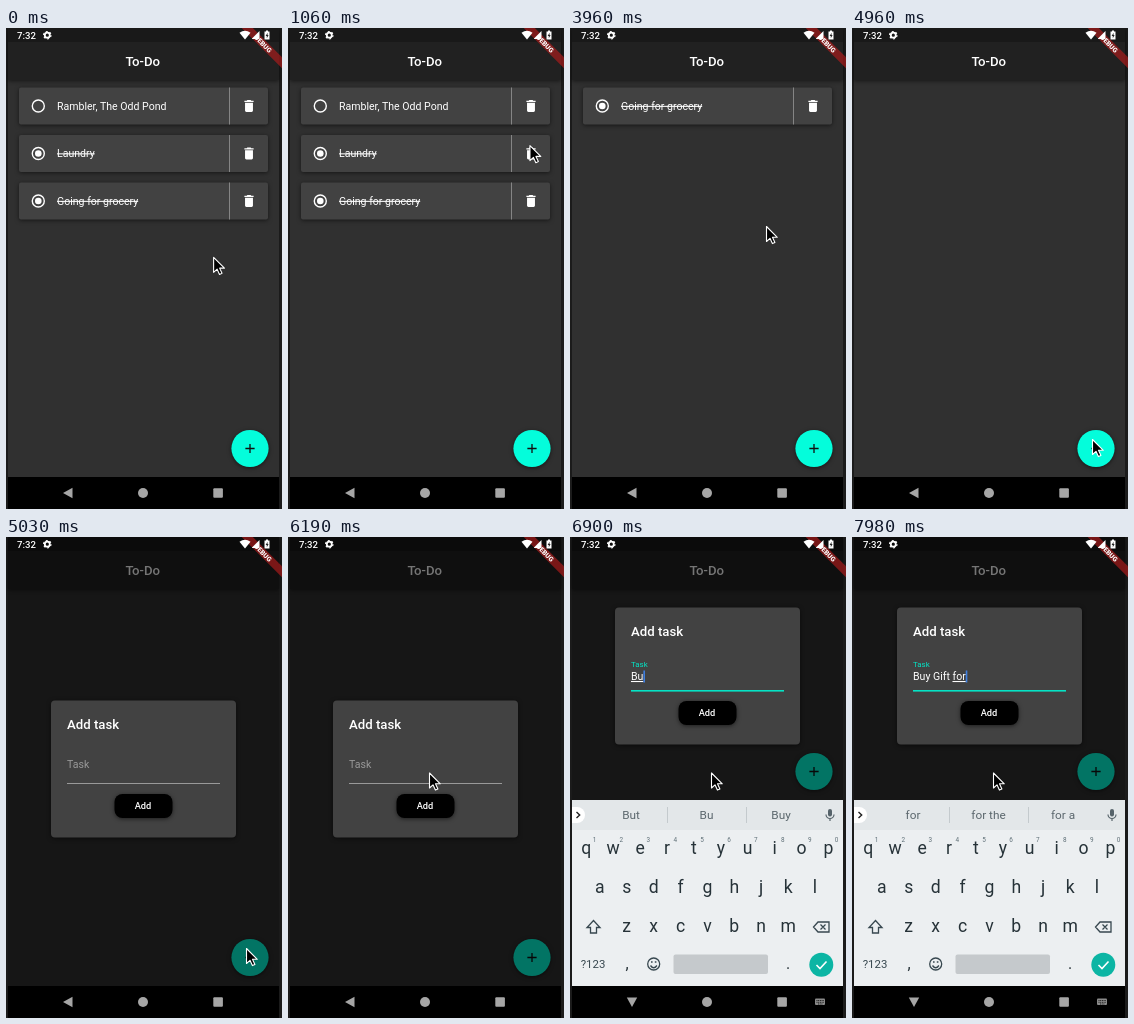
Recreate the animation shown at these times as an HTML page. Size 276 by 481 pixels, loop 8 s.

```html
<!DOCTYPE html>
<html lang="en">
<head>
<meta charset="utf-8">
<title>To-Do</title>
<style>
html, body { margin: 0; height: 100%; overflow: hidden; background: #1b1b1b; }
svg { display: block; width: 100vw; height: 100vh; font-family: Roboto, sans-serif; }
.mid { text-anchor: middle; }
.bold { font-weight: 500; }
.struck { text-decoration: line-through; }
.lift { filter: drop-shadow(0 1px 2px rgba(0,0,0,.55)); }
.line { fill: none; stroke: #37474f; stroke-width: 1.3; }
</style>
</head>
<body>
<svg id="stage" viewBox="0 0 276 481"></svg>
<script>
const LOOP = 8000;
const ACCENT = '#04fddb';
const TRASH = 'M6 19c0 1.1.9 2 2 2h8c1.1 0 2-.9 2-2V7H6v12zM19 4h-3.5l-1-1h-5l-1 1H5v2h14V4z';
const PLUS = 'M19 13h-6v6h-2v-6H5v-2h6V5h2v6h6v2z';

// Markup helpers
const text = (x, y, s, size, fill = '#fff', cls = '', extra = '') =>
  `<text x="${x}" y="${y}" font-size="${size}" fill="${fill}" class="${cls}" ${extra}>${s}</text>`;
const rect = (x, y, w, h, fill, extra = '') =>
  `<rect x="${x}" y="${y}" width="${w}" height="${h}" fill="${fill}" ${extra}/>`;
const circle = (x, y, r, fill, extra = '') =>
  `<circle cx="${x}" cy="${y}" r="${r}" fill="${fill}" ${extra}/>`;
const path = (d, fill, extra = '') => `<path d="${d}" fill="${fill}" ${extra}/>`;
const icon = (x, y, d, fill) =>
  path(d, fill, `transform="translate(${x} ${y}) scale(.66) translate(-12 -12)"`);

const tile = (id, label, done) => `<g id="${id}">
  ${rect(13, 59.5, 249, 37, '#424242', 'rx="2" class="lift"')}
  ${circle(32.3, 78, 6, 'none', 'stroke="#fff" stroke-width="1.4"')}
  ${done ? circle(32.3, 78, 3.3, '#fff') : ''}
  ${text(51, 81.7, label, 10.56, '#fff', done ? 'struck' : '')}
  ${rect(223, 59.5, 1, 37, '#858585')}
  ${icon(243, 78, TRASH, '#fff')}</g>`;

const statusBar = `
  ${text(11, 10.6, '7:32', 9.6, '#fff', 'bold')}
  ${circle(41.3, 7.2, 2.5, 'none', 'stroke="#fff" stroke-width="1.8"')}
  ${circle(41.3, 7.2, 3.7, 'none', 'stroke="#fff" stroke-width="1.2" stroke-dasharray="1.9 1.97"')}
  ${path('M239 11.5L233.5 4.8Q239 .8 244.5 4.8Z', '#fff')}
  ${path('M246 11V10.5L253.5 3V11Z', '#fff')}
  ${path('M258.5 3.5H260V2.5H262V3.5H263.5V11.5H258.5Z', '#fff')}
  ${path('M261.6 4.8L259.6 8H260.8V10.3L262.6 7H261.5Z', '#222')}`;

const banner = `<g transform="translate(273 0) rotate(45)">
  ${rect(-40, 18.5, 80, 7.9, 'rgba(183,28,28,.63)')}
  ${text(0, 24.9, 'DEBUG', 6.7, '#fff', 'mid', 'font-weight="900"')}</g>`;

const dialog = `<g id="dialog">
  ${rect(45, 163.5, 185, 137, '#424242', 'rx="4" class="lift"')}
  ${text(61, 192, 'Add task', 13.2, '#fff', 'bold')}
  ${text(61, 0, 'Task', 10.56, '#999', '', 'id="label"')}
  <text id="typed" x="61" y="236" font-size="10.56" fill="#fff"><tspan></tspan><tspan text-decoration="underline"></tspan></text>
  ${rect(0, 226.5, 1.6, 12, '#3f7fe0', 'id="caret"')}
  ${rect(61, 246, 153, 1, '#999', 'id="rule"')}
  ${rect(108.5, 257, 58, 24, '#000', 'rx="8" class="lift"')}
  ${text(137, 272.3, 'Add', 9.24, '#fff', 'mid bold')}</g>`;

const row = (keys, x, y) => [...keys].map((k, i) =>
  text(x + 26.9 * i, y, k, 17.6, '#263238', 'mid')).join('');
const digits = [...'1234567890'].map((d, i) =>
  text(24.5 + 26.9 * i, 304.5, d, 6.4, '#607078', 'mid')).join('');

const keyboard = `<g id="keyboard">
  ${rect(2, 263, 271, 186, '#eceff1')}
  ${rect(2, 263, 271, 30, '#e3e7e9')}
  ${[61, 136.5, 211].map(x => text(x, 282.3, '', 11.8, '#5b676d', 'mid hint')).join('')}
  ${rect(97, 270, 1, 16, '#c4cacd')}${rect(176, 270, 1, 16, '#c4cacd')}
  ${path('M2 270H7A8 8 0 0 1 7 286H2Z', '#fff')}
  ${path('M6.5 275L9.7 278L6.5 281', 'none', 'stroke="#222" stroke-width="1.4"')}
  ${rect(258, 272, 4, 7.5, '#56636a', 'rx="2"')}
  ${path('M256 277.5A4 4 0 0 0 264 277.5M260 281.5V284', 'none', 'stroke="#56636a" stroke-width="1.2"')}
  ${row('qwertyuiop', 16.3, 317)}${digits}
  ${row('asdfghjkl', 29.8, 356)}
  ${row('zxcvbnm', 56.7, 395)}
  <path class="line" d="M23.5 383.5L30 390.5H26.5V396H20.5V390.5H17Z"/>
  <path class="line" d="M248 385H259V395H248L243.5 390ZM250.5 387.5L255.5 392.5M255.5 387.5L250.5 392.5"/>
  ${text(23, 431.3, '?123', 11.4, '#37474f', 'mid')}
  ${text(57, 432, ',', 16, '#263238', 'mid')}
  <circle class="line" cx="83.7" cy="427" r="6"/>
  <path class="line" d="M80.5 428.5Q83.7 433 86.9 428.5M81 425H82.6M84.8 425H86.4"/>
  ${rect(103.5, 417.5, 94.5, 19.5, '#c5c9cc', 'rx="2"')}
  ${text(218, 432, '.', 16, '#263238', 'mid')}
  ${circle(251.3, 427.7, 12, '#0cb5a4')}
  ${path('M246.5 428L250 431.5L256.5 424.5', 'none', 'stroke="#fff" stroke-width="1.6"')}</g>`;

const nav = `${rect(2, 449, 271, 32, '#000')}
  ${path('M57 465L66.5 459.8V470.2Z', '#a6a6a6', 'id="back"')}
  ${circle(137, 465, 5, '#a6a6a6')}
  ${rect(207.3, 460.2, 9.6, 9.6, '#a6a6a6', 'rx="1"')}
  <g id="switcher">${rect(245, 461.5, 10, 6.5, '#8a8a8a', 'rx="1"')}
  ${path('M246.5 463.5H254M246.5 465.3H254M248 467H252.5', 'none', 'stroke="#000" stroke-width=".8" stroke-dasharray="1 .7"')}</g>`;

const stage = document.getElementById('stage');
stage.innerHTML = `
  ${rect(2, 0, 271, 449, '#303030')}
  ${rect(2, 0, 271, 52, '#212121', 'class="lift"')}
  ${rect(2, 0, 271, 14, '#191919')}
  ${text(136.7, 38.3, 'To-Do', 13.2, '#fff', 'mid bold')}
  ${tile('film', 'Rambler, The Odd Pond', false)}
  ${tile('laundry', 'Laundry', true)}
  ${tile('grocery', 'Going for grocery', true)}
  ${circle(0, 0, 10, 'rgba(255,255,255,.1)', 'id="splash"')}
  <g id="fab">${circle(244, 420.5, 18.6, ACCENT, 'class="lift"')}${icon(244, 420.5, PLUS, '#111')}</g>
  <g id="modal">${rect(2, 0, 271, 449, 'rgba(0,0,0,.54)')}${dialog}</g>
  ${banner}${statusBar}${nav}${keyboard}
  ${path('M.5 .5V15.5L4 12.3L6.4 17.6L8.9 16.5L6.5 11.3H11.3Z', '#000',
    'id="cursor" stroke="#fff" stroke-width="1.1" stroke-linejoin="round"')}`;

const el = {};
stage.querySelectorAll('[id]').forEach(n => el[n.id] = n);
const [before, word] = el.typed.children;
const hints = stage.querySelectorAll('.hint');

// Cursor stops: time, x, y
const stops = [
  [0, 207, 229], [280, 240, 181], [430, 240, 181], [710, 246, 117], [780, 246, 117],
  [950, 241, 110], [1200, 242, 126], [1560, 242, 126], [1770, 243, 106], [2000, 243, 106],
  [2070, 243, 86], [2140, 243, 84], [2880, 243, 84], [3090, 241, 80], [3750, 241, 80],
  [3960, 196, 198], [4040, 196, 198], [4670, 240, 411], [5260, 240, 411], [5400, 207, 357],
  [5480, 207, 357], [5620, 228, 463], [5700, 228, 463], [6050, 141, 235.5], [LOOP, 141, 235.5]
];
const typing = [
  [0, '', 'thanks|I|we'], [6830, 'B', 'But|By|Be'], [6900, 'Bu', 'But|Bu|Buy'],
  [6970, 'Buy ', 'a|the|it'], [7190, 'Buy G', 'Go|G|Get'], [7260, 'Buy Gi', 'Give|Gi|Girl'],
  [7330, 'Buy Gif', 'Gift|Gif|Gifs'], [7400, 'Buy Gift', 'Gift|Gifts|Gifted'],
  [7470, 'Buy Gift ', 'for|and|to'], [7840, 'Buy Gift f', 'for|f|from'],
  [7910, 'Buy Gift fo', 'for|fo|food'], [7980, 'Buy Gift for', 'for|for the|for a']
];
const taps = [[1420, 249, 125.5], [2440, 245, 83.5], [3310, 245, 79.5]];

const ramp = (t, a, b) => Math.min(1, Math.max(0, (t - a) / (b - a)));
const mix = (a, b, p) => a + (b - a) * p;
const show = (node, on) => node.style.display = on ? '' : 'none';
const move = (node, x, y) => node.setAttribute('transform', `translate(${x} ${y})`);
const set = (node, attrs) => { for (const k in attrs) node.setAttribute(k, attrs[k]); };

function drawList(t) {
  const gone = { laundry: 2070, film: 2950, grocery: 4110 };
  let slot = 0;
  for (const id of ['film', 'laundry', 'grocery']) {
    const here = t < gone[id];
    show(el[id], here);
    if (here) move(el[id], 0, 47.5 * slot++);
  }
  const tap = taps.find(([at]) => t >= at && t < at + 70);
  show(el.splash, tap);
  if (tap) move(el.splash, tap[1], tap[2]);
}

function drawDialog(t) {
  show(el.modal, t >= 5030);
  move(el.dialog, 0, -93 * ramp(t, 6540, 6680));
  const focused = t >= 6330, p = ramp(t, 6330, 6470);
  set(el.label, {
    y: mix(231, 223, p), 'font-size': mix(10.56, 7.92, p), fill: focused ? '#05e3c5' : '#999'
  });
  set(el.rule, { height: focused ? 1.6 : 1, fill: focused ? '#05e3c5' : '#999' });

  const [, typed, words] = typing.findLast(([at]) => t >= at);
  const cut = typed.lastIndexOf(' ') + 1;
  before.textContent = typed.slice(0, cut).replaceAll(' ', '\u00a0');
  word.textContent = typed.slice(cut);
  words.split('|').forEach((w, i) => hints[i].textContent = w);
  show(el.caret, focused && !(t >= 7690 && t < 7840));
  set(el.caret, { x: 61 + (typed && el.typed.getComputedTextLength()) });
}

function drawKeyboard(t) {
  const p = ramp(t, 6360, 6595), open = p > 0;
  show(el.keyboard, open);
  show(el.switcher, open);
  el.keyboard.style.opacity = p;
  move(el.keyboard, 0, 43 * (1 - p));
  set(el.back, { transform: open ? 'rotate(-90 62 465)' : '' });
  move(el.fab, 0, open ? -186 : 0);
}

function drawCursor(t) {
  const i = stops.findIndex(([at]) => at > t);
  const [t0, x0, y0] = stops[i - 1], [t1, x1, y1] = stops[i];
  const p = ramp(t, t0, t1);
  move(el.cursor, mix(x0, x1, p), mix(y0, y1, p));
}

const start = performance.now();
function frame() {
  const t = (performance.now() - start) % LOOP;
  drawList(t);
  drawDialog(t);
  drawKeyboard(t);
  drawCursor(t);
  requestAnimationFrame(frame);
}
frame();
</script>
</body>
</html>
```
